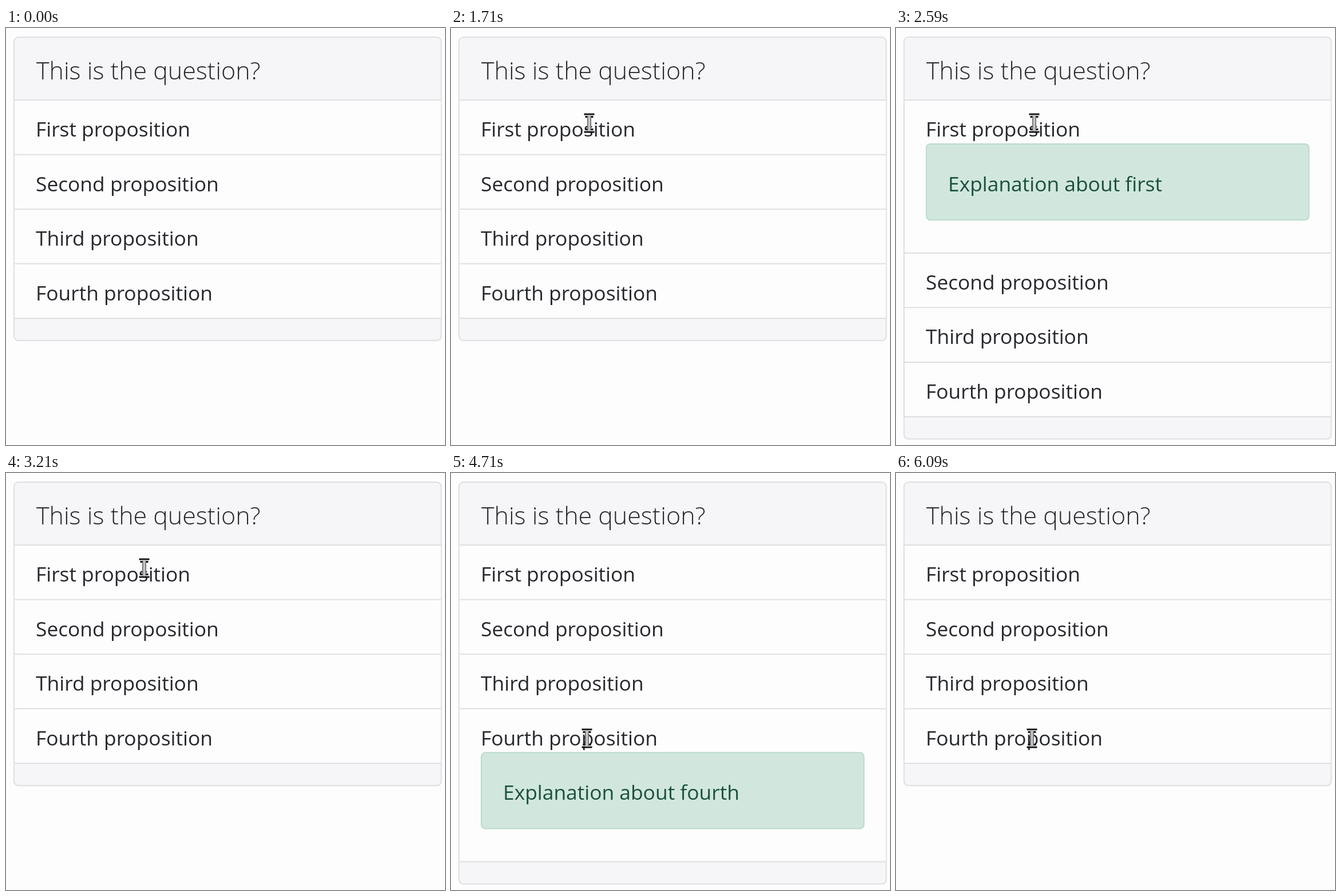
Write an HTML page that moves like this. It is 767 px wide and 730 px high and loops after 6210 ms.

```html
<!DOCTYPE html>
<html lang="en">
<head>
<meta charset="utf-8">
<title>Quiz card</title>
<style>
  html, body { margin: 0; width: 100%; height: 100%; overflow: hidden; background: #fefdfe; }
  svg { display: block; }
  text { font: 35.35px "Open Sans", "Noto Sans", sans-serif; fill: #25282c; }
  .title { font-size: 43px; font-weight: 300; }
  .card { fill: #f6f5f8; stroke: #dfdee2; stroke-width: 2; }
  .row { fill: #fefdfe; }
  .line { stroke: #dddce0; stroke-width: 2; }
  .alert { fill: #d1e7dd; stroke: #badbcc; stroke-width: 2; }
  .note { fill: #1a4f3e; }
</style>
</head>
<body>
<svg id="stage" width="767" height="730">
  <rect id="card" class="card" x="14" y="16" width="746.5" rx="8"/>
  <text class="title" x="53" y="90">This is the question?</text>
  <path class="line" d="M15 126.2H760"/>
  <g id="rows"></g>
  <g id="cursor" fill="none">
    <path d="M-9 -15.5H9M-9 15.5H9M-7 -11H7M-7 11H7" stroke="#111" stroke-width="2.8"/>
    <path d="M-7 -13.2H7M-7 13.2H7" stroke="#ddd" stroke-width="1.4"/>
    <path d="M0 -13V13" stroke="#666" stroke-width="7"/>
    <path d="M0 -14V14" stroke="#c4c4c4" stroke-width="4"/>
  </g>
</svg>
<script>
const LOOP = 6210, SLIDE = 350, PITCH = 95.5, PANEL = 172.3;
const byId = id => document.getElementById(id);
const clamp = v => Math.min(1, Math.max(0, v));

// opening and closing times of the panels, per row
const toggles = { 0: [1850, 2650], 3: [4300, 5100] };

const rows = ['First', 'Second', 'Third', 'Fourth'].map((name, i) => {
  const row = document.createElementNS('http://www.w3.org/2000/svg', 'g');
  row.innerHTML = `
    <rect class="row" x="15" y="127.2" width="744.5"/>
    <text x="52" y="190">${name} proposition</text>
    <svg class="panel" y="201" width="767" height="0" overflow="hidden">
      <rect class="alert" x="53" y="2" width="668.5" height="133" rx="7"/>
      <text class="note" x="91" y="84.5">Explanation about ${name.toLowerCase()}</text>
    </svg>
    <path class="line" d="M15 0H760"/>`;
  byId('rows').append(row);
  const part = selector => row.querySelector(selector);
  return { row, back: part('.row'), panel: part('.panel'), line: part('.line'), times: toggles[i] };
});

// cubic-bezier(.25, .1, .25, 1)
function ease(x) {
  const bezier = (u, a, b) => 3 * u * (1 - u) ** 2 * a + 3 * u * u * (1 - u) * b + u ** 3;
  let low = 0, high = 1;
  for (let i = 0; i < 20; i++) {
    const mid = (low + high) / 2;
    if (bezier(mid, .25, .25) < x) low = mid; else high = mid;
  }
  return bezier(low, .1, 1);
}
const progress = (t, start, length) => ease(clamp((t - start) / length));
const openness = (t, [open, close]) => progress(t, open, SLIDE) - progress(t, close, SLIDE);

function cursorAt(t) {
  const enter = progress(t, 550, 950), down = progress(t, 3450, 550);
  return [-12 + 253.5 * enter - 4 * down, 290 - 123.5 * enter + 298 * down];
}

function draw(now) {
  const t = now % LOOP;
  let shift = 0;
  rows.forEach(({ row, back, panel, line, times }, i) => {
    const height = times ? PANEL * openness(t, times) : 0;
    row.setAttribute('transform', `translate(0 ${i * PITCH + shift})`);
    back.setAttribute('height', PITCH + height);
    panel.setAttribute('height', height);
    line.setAttribute('transform', `translate(0 ${221.8 + height})`);
    shift += height;
  });
  byId('card').setAttribute('height', 531.3 + shift);
  byId('cursor').setAttribute('transform', `translate(${cursorAt(t)})`);
  requestAnimationFrame(() => draw(performance.now()));
}
draw(performance.now());
</script>
</body>
</html>
```
